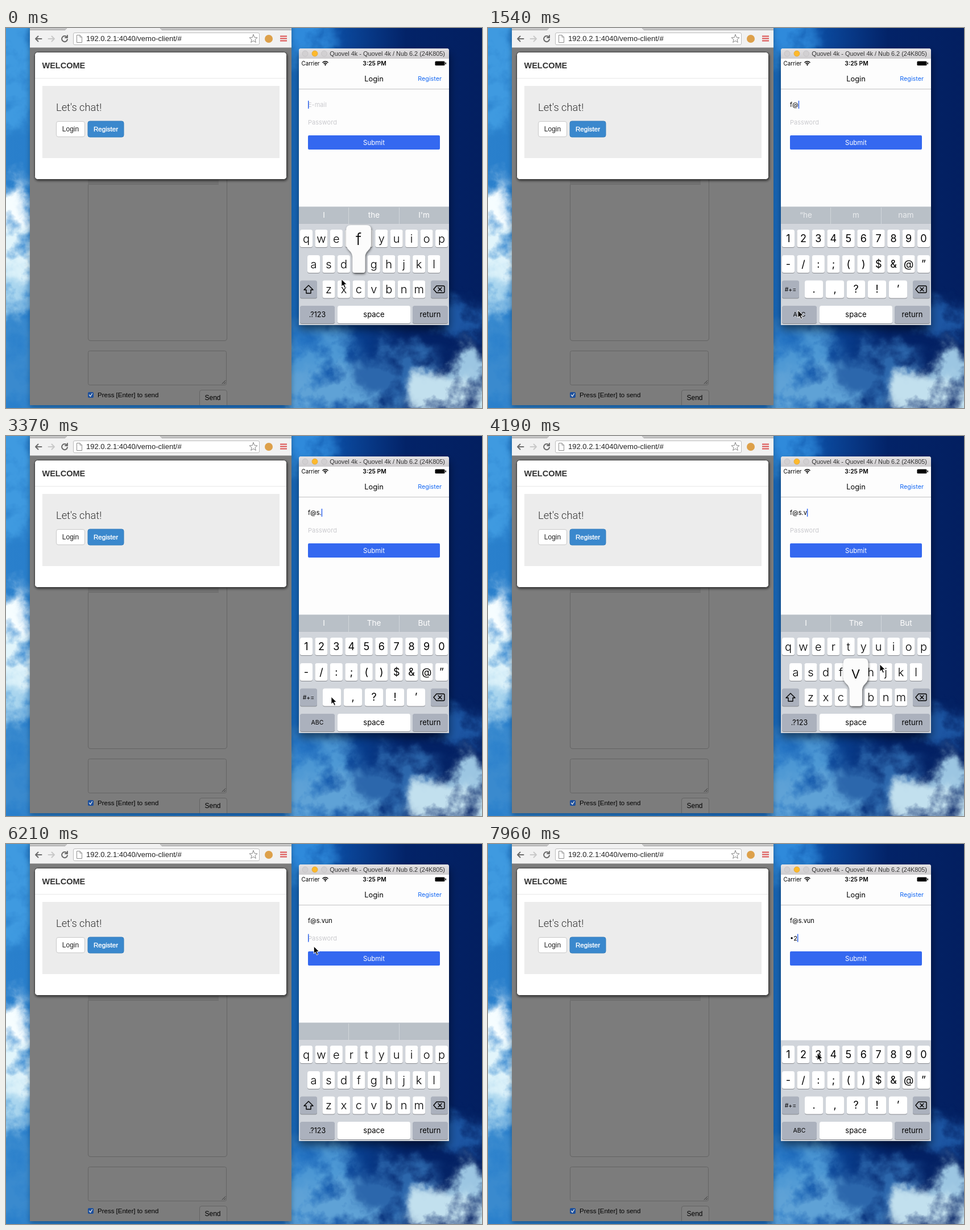
An HTML page for the animation above (8000 ms loop, 837x669 px).

```html
<!DOCTYPE html>
<html lang="en">
<head>
<meta charset="utf-8">
<title>Login typing</title>
<style>
html, body { margin: 0; width: 100%; height: 100%; overflow: hidden; background: #1560b5 }
svg { display: block; width: 837px; height: 669px; font-family: "Liberation Sans", Arial, sans-serif }
.phone { font-family: Inter, "Open Sans", sans-serif }
.mid { text-anchor: middle }
.thin { font-weight: 300 }
.line { fill: none; stroke-linecap: round; stroke-linejoin: round }
</style>
</head>
<body>
<svg id="stage" viewBox="0 0 837 669">
  <defs>
    <linearGradient id="sky">
      <stop offset="0" stop-color="#2a80cc"/><stop offset=".6" stop-color="#1a70c6"/>
      <stop offset=".7" stop-color="#0b4a9f"/><stop offset=".84" stop-color="#032368"/>
      <stop offset="1" stop-color="#031f60"/>
    </linearGradient>
    <linearGradient id="bar" x2="0" y2="1">
      <stop offset="0" stop-color="#e4e2e4"/><stop offset="1" stop-color="#cfcdcf"/>
    </linearGradient>
    <filter id="cloud" filterUnits="userSpaceOnUse" x="-60" y="-60" width="957" height="789" color-interpolation-filters="sRGB">
      <feTurbulence type="fractalNoise" baseFrequency=".02" numOctaves="5" seed="8" result="n"/>
      <feGaussianBlur in="SourceGraphic" stdDeviation="9"/>
      <feDisplacementMap in2="n" scale="70" xChannelSelector="R" yChannelSelector="G" result="c"/>
      <feColorMatrix in="n" values="0 0 0 0 0  0 0 0 0 0  0 0 0 0 0  2.6 0 0 0 -.4"/>
      <feComposite in="c" operator="in"/>
    </filter>
    <filter id="shade" x="-20%" y="-20%" width="140%" height="150%">
      <feDropShadow dx="0" dy="8" stdDeviation="8" flood-opacity=".5"/>
    </filter>
    <filter id="soft" x="-20%" y="-20%" width="140%" height="150%">
      <feDropShadow dx="0" dy="4" stdDeviation="5" flood-opacity=".3"/>
    </filter>
    <filter id="near" x="-10%" y="-10%" width="120%" height="125%">
      <feDropShadow dx="1" dy="2" stdDeviation="2" flood-opacity=".6"/>
    </filter>
  </defs>

  <rect width="837" height="669" fill="url(#sky)"/>
  <g id="clouds" filter="url(#cloud)"></g>

  <!-- browser -->
  <rect x="42" y="-20" width="460" height="684" fill="#7c7c7c" filter="url(#soft)"/>
  <rect x="42" width="460" height="34" fill="#f1f1f1"/>
  <path d="M42 0H106L104 3H42ZM272 0H502V3H274Z" fill="#c5c5c5"/>
  <path d="M42 3.5H104L107 0M271 0L274 3.5H502" fill="none" stroke="#a5a5a5"/>
  <path d="M42 34.5H502" stroke="#b0b0b0"/>
  <g class="line" stroke="#6b6b6b" stroke-width="2">
    <path d="M62.500 19H52M56.500 14.500L52 19L56.500 23.500"/>
    <path d="M74.500 19H85M80.500 14.500L85 19L80.500 23.500" stroke="#c9c9c9"/>
    <path d="M107 16A5 5 0 1 0 108 20M108 13V17H104"/>
  </g>
  <rect x="118.500" y="8.500" width="327" height="21" rx="2.500" fill="#fff" stroke="#bcbcbc"/>
  <path d="M124.500 12.500H130L133.500 16V25.500H124.500ZM130 12.500V16H133.500" fill="#fff" stroke="#8d8d8d"/>
  <text x="141" y="23" font-size="13" fill="#222">192.0.2.1:4040/vemo-client/#</text>
  <path class="line" d="M435 11.500L437 16.500L442 17L438 20.300L439.300 25.300L435 22.500L430.700 25.300L432 20.300L428 17L433 16.500Z" stroke="#858585"/>
  <circle cx="462" cy="19" r="7" fill="#dda04a"/>
  <path d="M482 14.500H494M482 18.500H494M482 22.500H494" stroke="#dc4f4f" stroke-width="2.200"/>

  <g fill="none" stroke="#646464">
    <path d="M144.500 260V546Q144.500 550.500 149 550.500H384Q388.500 550.500 388.500 546V260"/>
    <path d="M144 275.500H374" stroke="#6d6d6d"/>
    <rect x="144.500" y="568.500" width="243" height="60" rx="3"/>
    <path d="M380 626.500L386 620.500M383.500 626.500L386 624" stroke="#333"/>
    <path d="M340.500 664V641Q340.500 637.500 344 637.500H385Q388.500 637.500 388.500 641V664" fill="#7f7f7f"/>
  </g>
  <rect x="144" y="267" width="230" height="8" fill="#727272"/>
  <rect x="144" y="641" width="10" height="10" rx="2" fill="#1c4f9c"/>
  <path class="line" d="M146.500 646L148.500 648.500L151.500 643.500" stroke="#ddd" stroke-width="1.400"/>
  <text x="161" y="650" font-size="11.500">Press [Enter] to send</text>
  <text class="mid" x="363.500" y="655" font-size="12">Send</text>

  <rect x="50.500" y="42.500" width="443" height="224" rx="5" fill="#fff" stroke="#3c3c3c" filter="url(#near)"/>
  <text x="63.500" y="71" font-size="14.500" font-weight="bold" fill="#333">WELCOME</text>
  <path d="M51 88.500H493" stroke="#e8e8e8"/>
  <rect x="64" y="102" width="417" height="127" fill="#ececec"/>
  <text class="thin" x="88" y="146" font-size="18.300" fill="#333" font-family="Roboto, sans-serif">Let's chat!</text>
  <rect x="88.500" y="164.500" width="50" height="27" rx="3.500" fill="#fff" stroke="#c8c8c8"/>
  <rect x="144" y="164" width="63" height="28" rx="3.500" fill="#3a88cd" stroke="#357ebd"/>
  <text class="mid" x="113.500" y="182" font-size="12" fill="#222">Login</text>
  <text class="mid" x="175.500" y="182" font-size="11.600" fill="#fff" stroke="#fff" stroke-width=".35">Register</text>

  <!-- phone -->
  <path d="M515 523V40Q515 36 519 36H775Q779 36 779 40V523Z" fill="#fdfdfd" filter="url(#shade)"/>
  <path d="M515 54V40Q515 36 519 36H775Q779 36 779 40V54Z" fill="url(#bar)"/>
  <g stroke-width=".6">
    <circle cx="526" cy="45" r="5" fill="#d2d0d2" stroke="#bdbbbd"/>
    <circle cx="543" cy="45" r="5" fill="#fdb92c" stroke="#d99a20"/>
    <circle cx="559.500" cy="45" r="5" fill="#d2d0d2" stroke="#bdbbbd"/>
  </g>
  <text x="772" y="49" font-size="10.900" fill="#333" text-anchor="end">Quovel 4k - Quovel 4k / Nub 6.2 (24K805)</text>
  <g class="phone">
    <text x="519.500" y="66" font-size="9.800">Carrier</text>
    <path d="M556.500 61Q561.500 56.500 566.500 61M558.500 63Q561.500 60.300 564.500 63" fill="none" stroke="#000" stroke-width="1.500"/>
    <path d="M559.800 64.300Q561.500 62.800 563.200 64.300L561.500 66.500Z"/>
    <text class="mid" x="648" y="66" font-size="10.300" font-weight="600">3:25 PM</text>
    <rect x="754.500" y="58.500" width="17" height="7.500" rx="1.500"/><rect x="772.500" y="60.500" width="1.500" height="3.500" rx=".7"/>
    <text class="mid" x="647" y="93.500" font-size="12.800">Login</text>
    <text x="766" y="92.500" font-size="10.800" fill="#1468f3" text-anchor="end">Register</text>
    <path d="M515 107.500H779" stroke="#c0c0c2"/>
    <text id="mail" x="531" y="139" font-size="11"></text>
    <text id="pass" x="531" y="170" font-size="11"></text>
    <rect id="caret" width="1.500" height="14" fill="#3468f0"/>
    <rect x="531" y="189" width="232" height="25" rx="2" fill="#3468f0"/>
    <text class="mid" x="647" y="206" font-size="11.500" fill="#fff">Submit</text>

    <g id="hints" class="mid" fill="#fff" font-size="13.500">
      <rect x="515" y="314.500" width="264" height="31" fill="#b9c0c7"/>
      <path d="M602.500 316V345M691.500 316V345" stroke="#d0d5da"/>
      <text x="559" y="333.500"></text><text x="647" y="333.500"></text><text x="735" y="333.500"></text>
    </g>
    <rect x="515" y="345.500" width="264" height="177.500" fill="#d1d5db"/>
    <g id="abc" class="mid"></g>
    <g id="num" class="mid"></g>
    <g id="both" class="mid"></g>
    <g id="popup" class="mid thin">
      <path fill="#fcfcfc" filter="url(#near)"/><text font-size="29"></text>
    </g>
  </g>
  <path id="cursor" d="M0 0V13L3 10.300L5.200 15.300L7.500 14.300L5.300 9.400H9.500Z" stroke="#fff" stroke-width="1"/>
</svg>
<script>
const $ = id => document.getElementById(id);
const NS = 'http://www.w3.org/2000/svg';
function add(parent, tag, attrs, text = '') {
  const el = document.createElementNS(NS, tag);
  for (const k in attrs) el.setAttribute(k, attrs[k]);
  el.textContent = text;
  return parent.appendChild(el);
}

// Sky: x, y, rx, ry, colour
[
  [10, 60, 45, 130, '#3f9ae0'], [5, 345, 45, 75, '#f6fdff'], [15, 400, 45, 60, '#e2f5fb'],
  [5, 470, 40, 45, '#a9d5ee'], [20, 590, 50, 80, '#3a8ace'], [520, 20, 60, 55, '#2f8adb'],
  [535, 575, 75, 65, '#4d98d4'], [600, 640, 110, 45, '#5fa2d6'], [690, 605, 70, 50, '#2c67ac'],
  [790, 645, 80, 45, '#c2e0ee'], [820, 590, 40, 35, '#9cc6e2'], [805, 510, 45, 30, '#1d57a4'],
  [525, 535, 45, 30, '#2f7cc6']
].forEach(([cx, cy, rx, ry, fill]) => add($('clouds'), 'ellipse', { cx, cy, rx, ry, fill }));

// Keyboard
const ROWS = [355, 400, 444.5, 489], spots = {};
function key(group, x, row, w, label, size, fill = '#fff') {
  const y = ROWS[row];
  add(group, 'rect', { x: x - w / 2, y: y + 1, width: w, height: 31, rx: 3.5, fill: '#888b90' });
  add(group, 'rect', { x: x - w / 2, y, width: w, height: 31, rx: 3.5, fill });
  const text = add(group, 'text', { x, y: y + 15.5 + size * .35, 'font-size': size }, label);
  if (/^[a-z]$/.test(label)) text.setAttribute('class', 'thin');
  spots[label] = { x, y };
}
function row(group, chars, x, y, size, step = 26.45, w = 22) {
  [...chars].forEach((c, i) => key(group, x + i * step, y, w, c, size));
}
const GREY = '#abb1bd', abc = $('abc'), num = $('num'), both = $('both');
row(abc, 'qwertyuiop', 528, 0, 20);
row(abc, 'asdfghjkl', 541, 1, 20);
row(abc, 'zxcvbnm', 567.5, 2, 20);
key(abc, 532, 2, 30, '', 12, GREY);
add(abc, 'path', { class: 'line', stroke: '#000', 'stroke-width': 1.4, d: 'M532 453L540 461H536V467H528V461H524Z' });
key(abc, 547.5, 3, 61, '.?123', 12.5, GREY);
row(num, '1234567890', 528, 0, 18);
row(num, '-/:;()$&@”', 528, 1, 18);
row(num, '.,?!’', 573, 2, 18, 37, 32);
key(num, 532, 2, 30, '#+=', 10.5, GREY);
key(num, 547.5, 3, 61, 'ABC', 10.5, GREY);
key(both, 762, 2, 30, '', 12, GREY);
add(both, 'path', { class: 'line', stroke: '#000', 'stroke-width': 1.4, d: 'M757 454H769Q771 454 771 456V464Q771 466 769 466H757L752 460ZM760 457L766 463M766 457L760 463' });
key(both, 647, 3, 128, 'space', 13);
key(both, 746, 3, 62, 'return', 13, GREY);

// Timelines: [ms, value]
const mails = [[0, ''], [150, 'f'], [1270, 'f@'], [2280, 'f@s'], [3370, 'f@s.'], [4070, 'f@s.v'], [5020, 'f@s.vu'], [5380, 'f@s.vun']];
const passes = [[0, ''], [7500, '1'], [7850, '•2']];
const layouts = [[0, abc], [450, num], [1690, abc], [2800, num], [3720, abc], [6900, num]];
const popups = [[0, 'f'], [150, ''], [1420, '@'], [1540, ''], [2160, 's'], [2280, ''], [3250, '.'], [3370, ''],
  [4070, 'v'], [4300, ''], [4900, 'u'], [5020, ''], [5380, 'n'], [5620, ''], [7500, '1'], [7620, ''], [7730, '2'], [7850, '']];
const hints = [[0, 'I,the,I\'m'], [150, '“f”,for,from'], [1420, '“he,m,nam', .7], [1690, 'I,the,I\'m'], [2390, '“se,,', .75],
  [2650, '“s”,so,see'], [3370, 'I,The,But'], [4420, '“v”,very,via'], [5020, '“vu”,,'], [5800, ',,']];
const path = [[0, 590, 442], [150, 572, 482], [330, 552, 498], [500, 548, 498], [1030, 739, 414], [1300, 739, 416],
  [1540, 545, 497], [1690, 545, 497], [2040, 567, 412], [2280, 567, 414], [2500, 558, 515], [2650, 556, 512],
  [2800, 552, 502], [3010, 572, 457], [3370, 572, 459], [3600, 549, 498], [3720, 549, 498], [3960, 646, 455],
  [4070, 647, 455], [4190, 689, 402], [4420, 688, 368], [4900, 687, 368], [5150, 700, 456], [5300, 700, 456],
  [5500, 571, 207], [5740, 545, 171], [5850, 541, 170], [6200, 541, 170], [6560, 549, 498], [6850, 549, 498],
  [7030, 532, 404], [7140, 528, 369], [7500, 528, 369], [7620, 552, 368], [7840, 555, 368], [7960, 579, 368]];

const at = (list, t) => list.findLast(e => e[0] <= t);
const show = (el, on) => el.setAttribute('visibility', on ? 'visible' : 'hidden');

function field(el, value, placeholder) {
  el.textContent = value || placeholder;
  el.setAttribute('fill', value ? '#000' : '#cacace');
}

function drawPopup(label) {
  show($('popup'), label);
  if (!label) return;
  const { x, y } = spots[label], [shape, text] = $('popup').children;
  const half = label == '.' ? 16 : 11;
  const l = Math.max(515, x - 22), r = l + 43.5, t = y - 53, b = y + 31;
  shape.setAttribute('d', `M${l + 8} ${t}H${r - 8}Q${r} ${t} ${r} ${t + 8}V${t + 33}
    C${r} ${t + 45} ${x + half} ${t + 44} ${x + half} ${t + 57}V${b - 4}Q${x + half} ${b} ${x + half - 4} ${b}
    H${x - half + 4}Q${x - half} ${b} ${x - half} ${b - 4}V${t + 57}
    C${x - half} ${t + 44} ${l} ${t + 45} ${l} ${t + 33}V${t + 8}Q${l} ${t} ${l + 8} ${t}Z`);
  text.setAttribute('x', (l + r) / 2);
  text.setAttribute('y', t + 35);
  text.textContent = label;
}

function draw(t) {
  const mail = at(mails, t)[1], pass = at(passes, t)[1], inPass = t >= 6200;
  field($('mail'), mail, 'E-mail');
  field($('pass'), pass, 'Password');
  const active = inPass ? $('pass') : $('mail');
  $('caret').setAttribute('x', 531 + ((inPass ? pass : mail) && active.getComputedTextLength()));
  $('caret').setAttribute('y', inPass ? 158.5 : 128);

  const [, words, alpha = 1] = at(hints, t);
  show($('hints'), t < 6330);
  words.split(',').forEach((word, i) => {
    const el = $('hints').children[i + 2];
    el.textContent = word;
    el.setAttribute('opacity', alpha);
  });

  const layout = at(layouts, t)[1];
  show(abc, layout == abc);
  show(num, layout == num);
  drawPopup(at(popups, t)[1]);

  const a = at(path, t), b = path[path.indexOf(a) + 1] || a;
  const k = a == b ? 0 : (t - a[0]) / (b[0] - a[0]);
  const [x, y] = [1, 2].map(i => a[i] + (b[i] - a[i]) * k);
  $('cursor').setAttribute('transform', `translate(${x} ${y})`);
}

const start = performance.now();
function tick() {
  draw((performance.now() - start) % 8000);
  requestAnimationFrame(tick);
}
tick();
</script>
</body>
</html>
```
